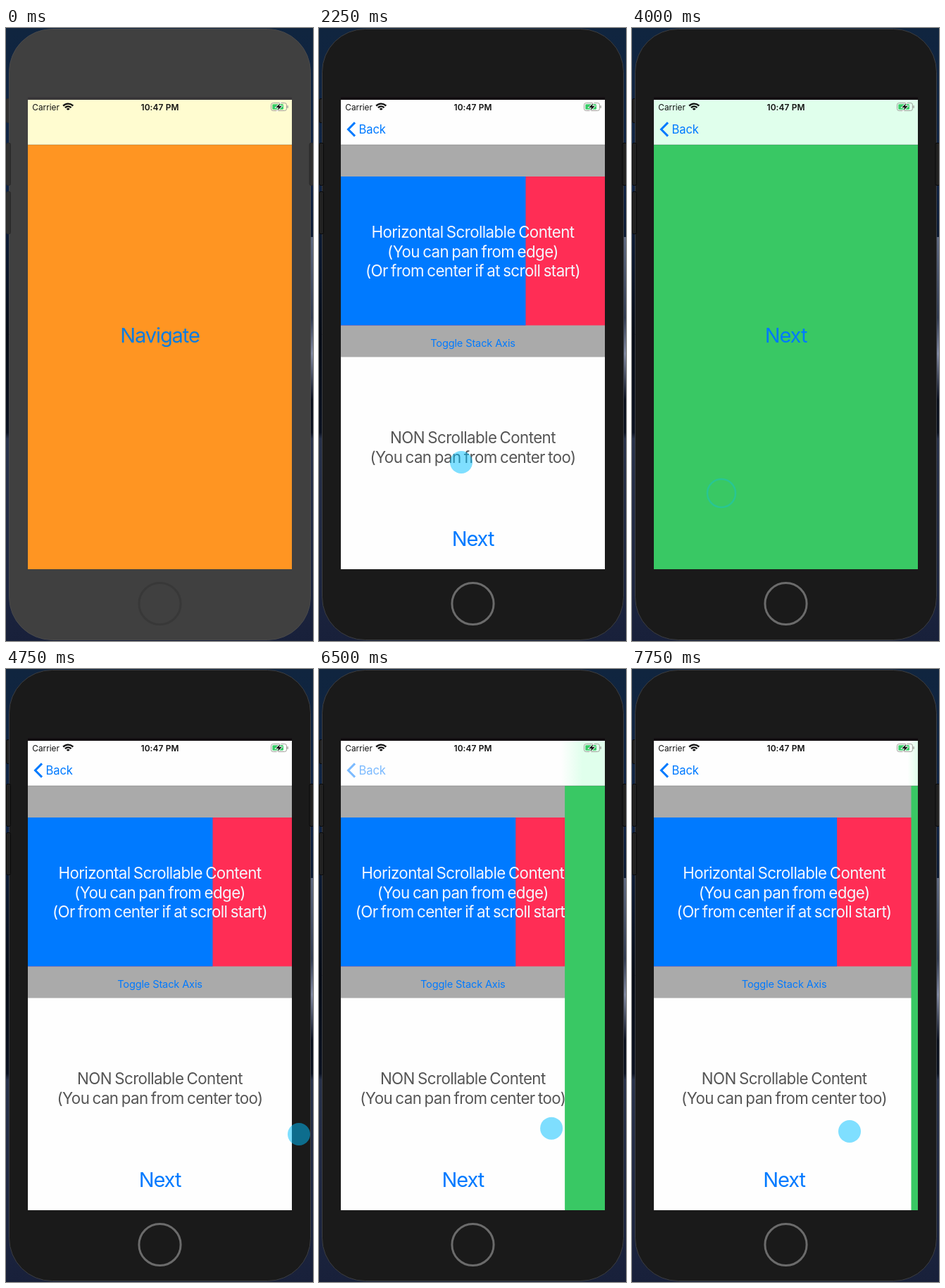
These frames come from a looping animation (436x871 px, 8 s). An HTML page with a canvas:

```html
<!DOCTYPE html>
<html lang="en">
<head>
<meta charset="utf-8">
<title>Swipe navigation</title>
<style>
  html, body { margin: 0; width: 100%; height: 100%; overflow: hidden; background: #0c1a33; }
  canvas { display: block; width: 436px; height: 871px; }
</style>
</head>
<body>
<canvas id="stage"></canvas>
<script>
const W = 436, H = 871, LOOP = 8000, STEP = 250;
const SCREEN = { x: 31, y: 102, w: 375, h: 667 };
const RIGHT = SCREEN.x + SCREEN.w, NAV_BOTTOM = 166;
const BLUE = '#007aff', FONT = 'Inter, Roboto, sans-serif';
const NAV_TINT = ['#fffcd0', '#fefefe', '#e0ffec'];

const canvas = document.getElementById('stage');
const ctx = canvas.getContext('2d');
const ratio = window.devicePixelRatio || 1;
canvas.width = Math.round(W * ratio);
canvas.height = Math.round(H * ratio);

const clamp = (v, lo = 0, hi = 1) => Math.min(hi, Math.max(lo, v));
const mix = (a, b, k) => a + (b - a) * k;
const smooth = k => k * k * (3 - 2 * k);
const easeOut = k => 1 - (1 - k) ** 2;

// A finger that starts at (x, y) and travels by (dx, dy) while the given page is on top
const drag = (start, time, page, x, y, dx, dy, ease = k => k) =>
  ({ start, end: start + time, page, x, y, dx, dy, ease });

function makeGestures() {
  const list = [drag(1000, 0, 0, 188, 438, 0, 0)];
  // Push and pop alternate, each round reaching further right
  for (let k = 0; k < 3; k++) {
    const t = 2250 + 1250 * k;
    list.push(drag(t, STEP, 1, 202 + 107 * k, 617 + 22 * k, -182, 22));
    list.push(drag(t + 750, STEP, 2, 100 - 40 * k, 650, 187 + 101 * k, 0));
  }
  list.push(drag(6000, 750, 1, 387, 650, -64, 3, easeOut));
  list[list.length - 1].end += 500;
  list.push(drag(7500, 500, 1, 318.5, 655, -19, 4));
  list.forEach(g => { g.travel = g.start === 6000 ? 750 : g.end - g.start || 1; });
  return list;
}

const GESTURES = makeGestures();
const progress = (g, t) => g.ease(clamp((t - g.start) / g.travel));
const gestureAt = t => GESTURES.filter(g => g.start <= t).pop();

// Position in the page stack: 0 first page, 1 second, 2 third
function depthAt(t) {
  const g = gestureAt(t);
  if (!g) return 0;
  if (g.page === 0) return smooth(clamp((t - 1120) / 500));
  const moved = -g.dx / SCREEN.w;
  const far = Math.abs(moved) > 0.4 ? Math.sign(moved) : 0;
  return clamp(g.page + (t <= g.end ? moved * progress(g, t) : far), 1, 2);
}

function rect(x, y, w, h, color) {
  ctx.fillStyle = color;
  ctx.fillRect(x, y, w, h);
}

function roundRect(x, y, w, h, r, fill, stroke) {
  ctx.beginPath();
  ctx.roundRect(x, y, w, h, r);
  paint(fill, stroke);
}

function circle(x, y, r, fill, stroke, width) {
  ctx.beginPath();
  ctx.arc(x, y, r, 0, Math.PI * 2);
  paint(fill, stroke, width);
}

function paint(fill, stroke, width = 1) {
  if (fill) {
    ctx.fillStyle = fill;
    ctx.fill();
  }
  if (stroke) {
    ctx.lineWidth = width;
    ctx.strokeStyle = stroke;
    ctx.stroke();
  }
}

function text(str, x, y, size, color, { track = -0.01, space = 0, align = 'center', weight = 400 } = {}) {
  ctx.font = `${weight} ${size}px ${FONT}`;
  ctx.letterSpacing = `${(size * track).toFixed(3)}px`;
  ctx.wordSpacing = `${(size * space).toFixed(3)}px`;
  ctx.textAlign = align;
  ctx.fillStyle = color;
  ctx.fillText(str, x, y);
}

const title = (str, x, y, color) => text(str, x, y, 29, color, { track: -0.038 });

function paragraph(lines, x, y, color) {
  lines.forEach((line, i) =>
    text(line, x, y + i * 27.4, 22.3, color, { track: -0.026, space: -0.063 }));
}

function gradient(x0, y0, x1, y1, ...stops) {
  const g = ctx.createLinearGradient(x0, y0, x1, y1);
  stops.forEach(([at, color]) => g.addColorStop(at, color));
  return g;
}

function drawWallpaper() {
  rect(0, 0, W, H, gradient(0, 0, 0, H,
    [0, '#10253f'], [0.25, '#0f2345'], [0.5, '#050a14'],
    [0.66, '#0a1120'], [0.67, '#27314a'], [1, '#18203a']));
  rect(432, 297, 4, 230, gradient(0, 297, 0, 527,
    [0, '#5d6880'], [0.5, '#323c52'], [0.72, '#8088a0'], [1, '#0a1020']));
}

function drawShell(active) {
  const button = (x, y, h) =>
    roundRect(x, y, 6, h, 2, active ? '#222' : '#303030', active ? '#080808' : '#292929');
  button(0.5, 100.5, 34);
  roundRect(4.5, 1.5, 428, 868, 61, active ? '#1a1a1a' : '#404040', active ? '#3c3e42' : '#4a4a4b');
  button(0.5, 163.5, 60);
  button(0.5, 232.5, 60);
  button(431, 163.5, 60);
  rect(SCREEN.x, 98, SCREEN.w, 4, active ? '#130f12' : '#393739');
  circle(218.5, 818, 29.6, null, active ? '#6b6b6b' : '#383838', 3);
}

const PAGES = [
  (x, mid, pressed) => {
    rect(x, SCREEN.y, SCREEN.w, SCREEN.h, '#ff9522');
    title('Navigate', mid, 446.5, pressed ? '#b68d4c' : '#0b7ce0');
  },
  (x, mid) => {
    rect(x, SCREEN.y, SCREEN.w, SCREEN.h, '#fefefe');
    rect(x, NAV_BOTTOM, SCREEN.w, 301.5, '#aaa');
    rect(x, 211, SCREEN.w, 211.5, '#ff2d55');
    rect(x, 211, 262.5, 211.5, BLUE);
    paragraph(['Horizontal Scrollable Content', '(You can pan from edge)',
      '(Or from center if at scroll start)'], mid, 298.3, '#f4f8ff');
    text('Toggle Stack Axis', mid, 453.2, 14.6, BLUE);
    paragraph(['NON Scrollable Content', '(You can pan from center too)'], mid, 590.3, '#555');
    title('Next', mid, 735.6, BLUE);
  },
  (x, mid) => {
    rect(x, SCREEN.y, SCREEN.w, SCREEN.h, '#39c864');
    title('Next', mid, 446.5, BLUE);
  }
];

const drawPage = (i, x, pressed) => PAGES[i](x, x + SCREEN.w / 2, pressed);

function drawBack(alpha) {
  ctx.globalAlpha = alpha;
  ctx.stroke(chevron());
  text('Back', 56.6, 150.2, 16.6, BLUE, { align: 'left' });
  ctx.globalAlpha = 1;
}

function chevron() {
  ctx.lineWidth = 3;
  ctx.strokeStyle = BLUE;
  return new Path2D('M51 134.4 L41.5 144 L51 153.6');
}

function drawStatus() {
  const ink = '#111', rim = '#a0a09a';
  text('Carrier', 37.3, 116.6, 11.8, ink, { align: 'left', track: 0 });
  text('10:47 PM', 218.5, 116.6, 11.9, ink, { weight: 600, track: 0.01 });

  // Signal
  for (let i = 0; i < 3; i++) {
    ctx.beginPath();
    ctx.arc(88.2, 117.2, 2 + 3.8 * i, -Math.PI * 0.76, -Math.PI * 0.24);
    paint(null, ink, 2.4);
  }

  // Battery
  roundRect(376.5, 106.5, 22, 11, 2.8, null, rim);
  roundRect(378.3, 108.2, 15.7, 7.6, 1.4, '#38cb67');
  roundRect(399.4, 110, 1.4, 4, 0.7, rim);
  const bolt = new Path2D('M389.5 106.8 L383.2 112.9 H387 L385.5 117.2 L391.8 111 H388 Z');
  ctx.lineWidth = 1.6;
  ctx.strokeStyle = '#fff';
  ctx.stroke(bolt);
  ctx.fillStyle = ink;
  ctx.fill(bolt);
}

function drawNav(lower, upper, p, edge) {
  const at = x => clamp((x - SCREEN.x) / SCREEN.w);
  const fill = p === 0 ? NAV_TINT[lower] : gradient(SCREEN.x, 0, RIGHT, 0,
    [at(edge - 5), NAV_TINT[lower]], [at(edge + 25), NAV_TINT[upper]]);
  rect(SCREEN.x, SCREEN.y, SCREEN.w, NAV_BOTTOM - SCREEN.y, fill);
  rect(SCREEN.x, NAV_BOTTOM - 0.5, SCREEN.w, 0.8, 'rgba(0,0,0,.28)');
  drawBack(lower === 0 ? p : Math.max(clamp(1 - (p - 0.03) * 4), p));
  drawStatus();
}

function drawScreen(depth, pressed) {
  const lower = Math.floor(depth), p = depth - lower;
  const upper = Math.min(lower + 1, 2);
  const edge = SCREEN.x + SCREEN.w * (1 - p);
  ctx.save();
  ctx.beginPath();
  ctx.rect(SCREEN.x, SCREEN.y, SCREEN.w, SCREEN.h);
  ctx.clip();
  drawPage(lower, SCREEN.x - (RIGHT - edge) * 0.25, pressed);
  if (p > 0) drawPage(upper, edge, false);
  drawNav(lower, upper, p, edge);
  ctx.restore();
}

// A disc while the finger is down, a ring just after it lifts
function drawTouch(t) {
  const g = gestureAt(t);
  if (!g || t > g.end + STEP) return;
  const k = progress(g, t), x = g.x + g.dx * k, y = g.y + g.dy * k;
  if (t <= g.end) circle(x, y, 16, 'rgba(0,191,255,.5)');
  else circle(x, y, 20, null, 'rgba(0,191,255,.3)', 2.5);
}

function draw(t) {
  ctx.setTransform(ratio, 0, 0, ratio, 0, 0);
  drawWallpaper();
  drawShell(t >= STEP);
  drawScreen(depthAt(t), t >= 1000);
  drawTouch(t);
}

const begin = performance.now();
function tick() {
  const t = (performance.now() - begin) % LOOP;
  draw(Math.floor(t / STEP) * STEP);
  requestAnimationFrame(tick);
}
tick();
</script>
</body>
</html>
```
